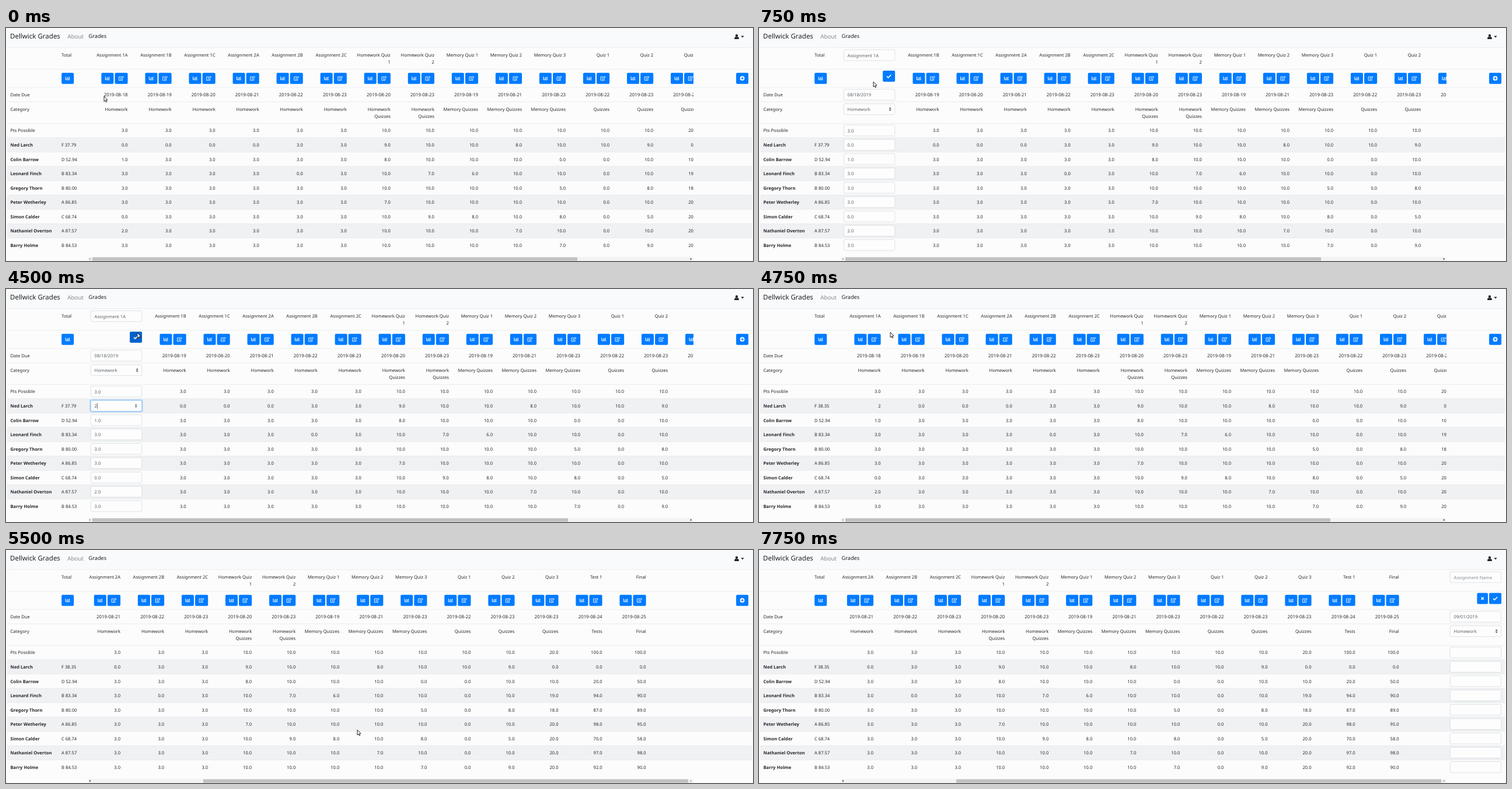
Recreate the animation shown at these times as an HTML page with a canvas. Size 1280 px wide and 399 px high, loop 8000 ms.

```html
<!DOCTYPE html>
<html lang="en">
<head>
<meta charset="utf-8">
<title>Gradebook</title>
<style>
html, body { margin: 0; width: 100%; height: 100%; overflow: hidden; background: #fcfcfc; }
canvas { display: block; width: 1280px; height: 399px; }
</style>
</head>
<body>
<canvas id="stage" width="1280" height="399"></canvas>
<script>
const ctx = document.getElementById('stage').getContext('2d');
const LOOP = 8000, STEP = 250;
const BLUE = '#007bff', DARK = '#0062cc', INK = '#25292d', GREY = '#5a6168', PAPER = '#fcfcfc';
const LEFT = 140, RIGHT = 1178, PITCH = 75.05, EDGE = 208.6, SCROLL = 237.7, WIDEN = 25;
const ROW0 = 175.5, ROW_H = 24.53;
const NAME_Y = 46.5, TOOLS_Y = 86.2, DATE_Y = 114.2, CATEGORY_Y = 139;

// Students keep only the marks that fall short of the maximum.
const student = (name, total, marks) => ({
  name, total, marks: Object.fromEntries(marks.split(', ').map(m => m.split(' ')))
});
const students = [
  student('Ned Larch', 'F 37.79', 'HQ1 9, MQ2 8, Q2 9'),
  student('Colin Barrow', 'D 52.94', 'A1A 1, HQ1 8, MQ3 0, Q3 10, T1 20, F 50'),
  student('Leonard Finch', 'B 83.34', 'A2B 0, HQ2 7, MQ1 6, Q3 19, T1 94, F 90'),
  student('Gregory Thorn', 'B 80.00', 'MQ3 5, Q2 8, Q3 18, T1 87, F 89'),
  student('Peter Wetherley', 'A 86.85', 'HQ1 7, T1 98, F 95'),
  student('Simon Calder', 'C 68.74', 'A1A 0, HQ2 9, MQ1 8, MQ3 8, Q2 5, T1 70, F 58'),
  student('Nathaniel Overton', 'A 87.57', 'A1A 2, MQ2 7, T1 97, F 98'),
  student('Barry Holme', 'B 84.53', 'MQ3 7, Q2 9, T1 92, F 90')
];

// The first student skipped the early homework and the last tests; everyone else skipped Quiz 1.
const skipped = (id, i) => i === 0 ? /A1|A2A|Q3$|^T|^F/.test(id) && id !== 'MQ3' : id === 'Q1';

const group = (title, prefix, ids, category, max, day, gap = 1) => ids.split(' ').map((n, k) => ({
  name: `${title} ${n}`.trim().replace('Homework Quiz ', 'Homework Quiz|').split('|'),
  date: `2019-08-${day + k * gap}`,
  category: category.split('|'),
  scores: [max, ...students.map((s, i) => skipped(prefix + n, i) ? 0 : s.marks[prefix + n] ?? max)]
    .map(v => Number(v).toFixed(1))
}));
const columns = [
  group('Assignment', 'A', '1A 1B 1C 2A 2B 2C', 'Homework', 3, 18),
  group('Homework Quiz', 'HQ', '1 2', 'Homework|Quizzes', 10, 20, 3),
  group('Memory Quiz', 'MQ', '1 2 3', 'Memory Quizzes', 10, 19, 2),
  group('Quiz', 'Q', '1 2', 'Quizzes', 10, 22),
  group('Quiz', 'Q', '3', 'Quizzes', 20, 23),
  group('Test', 'T', '1', 'Tests', 100, 24),
  group('Final', 'F', '', 'Final', 100, 25)
].flat();

// Pointer stops: time, x, y
const path = [
  [0, 168, 117], [500, 197, 88], [750, 196, 92], [1250, 186, 178], [1750, 166, 199],
  [2500, 124, 197], [3500, 124, 197], [4500, 225, 75], [4750, 225, 74],
  [5250, 585, 390], [5500, 602, 308], [6000, 306, 289], [7000, 1260, 86], [LOOP, 1260, 86]
];

function pointerAt(t) {
  const i = path.findIndex(p => p[0] > t);
  const [t0, x0, y0] = path[i - 1], [t1, x1, y1] = path[i];
  const k = (t - t0) / (t1 - t0);
  return [x0 + (x1 - x0) * k, y0 + (y1 - y0) * k];
}

const rowY = i => ROW0 + i * ROW_H;

function text(str, x, y, { size = 7.6, color = INK, align = 'left', weight = 400 } = {}) {
  ctx.font = `${weight} ${size}px "Noto Sans", "Open Sans", sans-serif`;
  ctx.fillStyle = color;
  ctx.textAlign = align;
  ctx.fillText(str, x, y + size * 0.39);
}
const right = (str, x, y, size) => text(str, x, y, { align: 'right', size });

function rect(x, y, w, h, color) {
  ctx.fillStyle = color;
  ctx.fillRect(x, y, w, h);
}

function box(x, y, w, h, fill, stroke, width = 0.6) {
  ctx.beginPath();
  ctx.roundRect(x, y, w, h, 2);
  if (fill) { ctx.fillStyle = fill; ctx.fill(); }
  if (stroke) { ctx.strokeStyle = stroke; ctx.lineWidth = width; ctx.stroke(); }
}

function trace(points) {
  ctx.beginPath();
  points.forEach(([x, y]) => ctx.lineTo(x, y));
}

function poly(points, color) {
  trace(points);
  ctx.fillStyle = color;
  ctx.fill();
}

function line(points, color, width) {
  trace(points);
  ctx.strokeStyle = color;
  ctx.lineWidth = width;
  ctx.stroke();
}

function disc(x, y, r, color) {
  ctx.beginPath();
  ctx.arc(x, y, r, 0, 7);
  ctx.fillStyle = color;
  ctx.fill();
}

const icons = {
  chart() {
    line([[-3.5, -3], [-3.5, 2.5], [4, 2.5]], '#fff', 1);
    [1.7, 3.3, 2.7, 4].forEach((h, i) => rect(-2 + i * 1.5, 1.2 - h, 0.9, h, '#fff'));
  },
  edit() {
    line([[0.4, -2.5], [-4, -2.5], [-4, 3.5], [2, 3.5], [2, 1]], '#fff', 0.9);
    line([[-1.4, 1.4], [-1.1, -0.2], [2.5, -3.6], [4, -2.1], [0.4, 1.2], [-1.4, 1.4]], '#fff', 0.8);
    line([[1.6, -2.7], [3.1, -1.2]], '#fff', 0.7);
  },
  plus(bg) {
    disc(0, 0, 3.9, '#fff');
    rect(-2.3, -0.6, 4.6, 1.2, bg);
    rect(-0.6, -2.3, 1.2, 4.6, bg);
  },
  check() { line([[-3.6, 0.1], [-1.2, 2.4], [3.6, -2.5]], '#fff', 1.6); },
  cross() {
    line([[-2.1, -2.1], [2.1, 2.1]], '#fff', 1.5);
    line([[2.1, -2.1], [-2.1, 2.1]], '#fff', 1.5);
  }
};

function button(icon, x, w, y = TOOLS_Y, hover = false) {
  const bg = hover ? DARK : BLUE;
  box(x, y - 9.5, w, 19, bg);
  ctx.save();
  ctx.translate(x + w / 2, y);
  icons[icon](bg);
  ctx.restore();
}

function arrows(x, y, color) {
  for (const s of [-1, 1]) poly([[x - 2, y + s * 0.7], [x + 2, y + s * 0.7], [x, y + s * 3]], color);
}

function input(x, y, value, color = GREY) {
  box(x + 0.25, y - 9.3, 87.5, 18.6, '#fdfdfd', '#c8ced4');
  text(value, x + 6.6, y + 0.3, { color });
}

function form(x, name, nameColor, date, scores) {
  input(x, NAME_Y, name, nameColor);
  input(x, DATE_Y, date);
  input(x, CATEGORY_Y, 'Homework');
  arrows(x + 79.7, CATEGORY_Y, '#343a40');
  scores.forEach((s, i) => input(x, rowY(i), s));
}

function focusedInput(t) {
  const y = rowY(1);
  box(144.2, y - 10.3, 89.6, 20.6, null, 'rgba(0,123,255,.25)', 1.6);
  box(145.25, y - 9.3, 87.5, 18.6, '#fdfdfd', '#80bdff', 0.8);
  arrows(222.7, y, '#555');
  const typed = t >= 3250;
  const selected = t >= 2250 && !typed;
  if (selected) rect(151.4, y - 5.2, 10.8, 10.8, '#2f86d8');
  else rect(typed ? 156.4 : 162.6, y - 5, 0.6, 10.5, '#222');
  text(typed ? '2' : '0.0', 151.6, y + 0.3, { color: selected ? '#fff' : '#495057' });
}

function frame() {
  rect(0, 0, 1280, 399, PAPER);
  rect(0, 0, 1280, 33.5, '#f9fafb');
  const rules = [33.5, 70.1, 101.7, 126.2];
  for (let i = 0; i < 9; i++) {
    const top = rowY(i) - 12.4;
    rules.push(top);
    if (i % 2) rect(2, top, 1276, ROW_H, '#f0f1f3');
  }
  rules.forEach(y => rect(2, y, 1276, 0.55, '#dee2e6'));
}

function navbar() {
  const ink = '#1d2125';
  text('Dellwick Grades', 7, 13.8, { size: 11.5, color: ink, weight: 500 });
  text('About', 105.3, 13.7, { size: 9.8, color: '#85898d' });
  text('Grades', 141.5, 13.7, { size: 9.2, color: ink, weight: 500 });
  disc(1252, 12.9, 2.2, ink);
  ctx.beginPath();
  ctx.roundRect(1248.2, 15.2, 7.6, 3.8, [2, 2, 0.6, 0.6]);
  ctx.fill();
  poly([[1259.3, 13.6], [1264.7, 13.6], [1262, 16.4]], ink);
}

function sidebar(saved) {
  text('Total', 95, NAME_Y);
  button('chart', 95.2, 21);
  text('Date Due', 7.5, DATE_Y);
  text('Category', 7.5, CATEGORY_Y);
  text('Pts Possible', 7.5, ROW0);
  students.forEach(({ name, total }, i) => {
    text(name, 7.5, rowY(i + 1), { weight: 700 });
    text(i === 0 && saved ? 'F 38.35' : total, 95, rowY(i + 1));
  });
}

function drawColumn(col, x, hover, edited) {
  col.name.forEach((s, i) => right(s, x, NAME_Y + i * 12));
  button('chart', x - 45.2, 21);
  button('edit', x - 22.1, 22.1, TOOLS_Y, hover);
  right(col.date, x, DATE_Y, 7.85);
  col.category.forEach((s, i) => right(s, x, CATEGORY_Y + i * 12));
  col.scores.forEach((s, i) => right(edited && i === 1 ? '2' : s, x, rowY(i)));
}

function grid(t, editing, saved, scroll) {
  ctx.save();
  ctx.beginPath();
  ctx.rect(LEFT, 0, RIGHT - LEFT, 399);
  ctx.clip();
  columns.forEach((col, i) => {
    if (i === 0 && editing) return;
    const x = EDGE + i * PITCH - scroll + (editing ? WIDEN : 0);
    drawColumn(col, x, i === 0 && t === 500, i === 0 && saved);
  });
  if (editing) {
    form(145, 'Assignment 1A', GREY, '08/18/2019', columns[0].scores);
    button('check', 212.1, 21, 82.6, t === 4500);
    if (t >= 1750) focusedInput(t);
  }
  ctx.restore();
}

function scrollbar(editing, scroll) {
  rect(LEFT, 392.3, RIGHT - LEFT, 6.7, '#f3f3f3');
  rect(scroll ? 338 : 148, 392.6, editing ? 815 : 831, 6, '#c1c1c1');
  const tip = (x, dir, active) =>
    poly([[x, 395.6], [x + dir, 393.6], [x + dir, 397.6]], active ? '#505050' : '#a3a3a3');
  tip(142.2, 2.6, scroll);
  tip(1175.2, -2.6, !scroll);
}

function pointer(t) {
  const [x, y] = pointerAt(t);
  if (t >= 1250 && t < 2500) {
    for (const end of [-6, 6]) line([[x - 2, y + end], [x + 2, y + end]], '#222', 0.8);
    line([[x, y - 6], [x, y + 6]], '#222', 0.8);
    return;
  }
  const shape = [[0, 0], [0, 8.8], [2, 7], [3.4, 10], [4.7, 9.4], [3.4, 6.4], [6, 6.2], [0, 0]]
    .map(([a, b]) => [x + a, y + b]);
  poly(shape, '#fff');
  line(shape, '#111', 0.9);
}

function draw(t) {
  const editing = t >= 750 && t < 4750;
  const saved = t >= 4750;
  const scroll = t >= 5250 ? SCROLL : 0;
  frame();
  navbar();
  sidebar(saved);
  grid(t, editing, saved, scroll);
  scrollbar(editing, scroll);
  if (t >= 7500) {
    form(1184, 'Assignment Name', '#878e95', '09/01/2019', Array(9).fill(''));
    button('cross', 1230.4, 18.6, 83);
    button('check', 1251.1, 21, 83, t === 7500);
  } else {
    button('plus', 1251.1, 21, TOOLS_Y, t >= 7000);
  }
  if (t < 7750) pointer(t);
}

ctx.textRendering = 'geometricPrecision';
const start = performance.now();
function tick() {
  const t = (performance.now() - start) % LOOP;
  draw(Math.floor(t / STEP) * STEP);
  requestAnimationFrame(tick);
}
tick();
</script>
</body>
</html>
```
